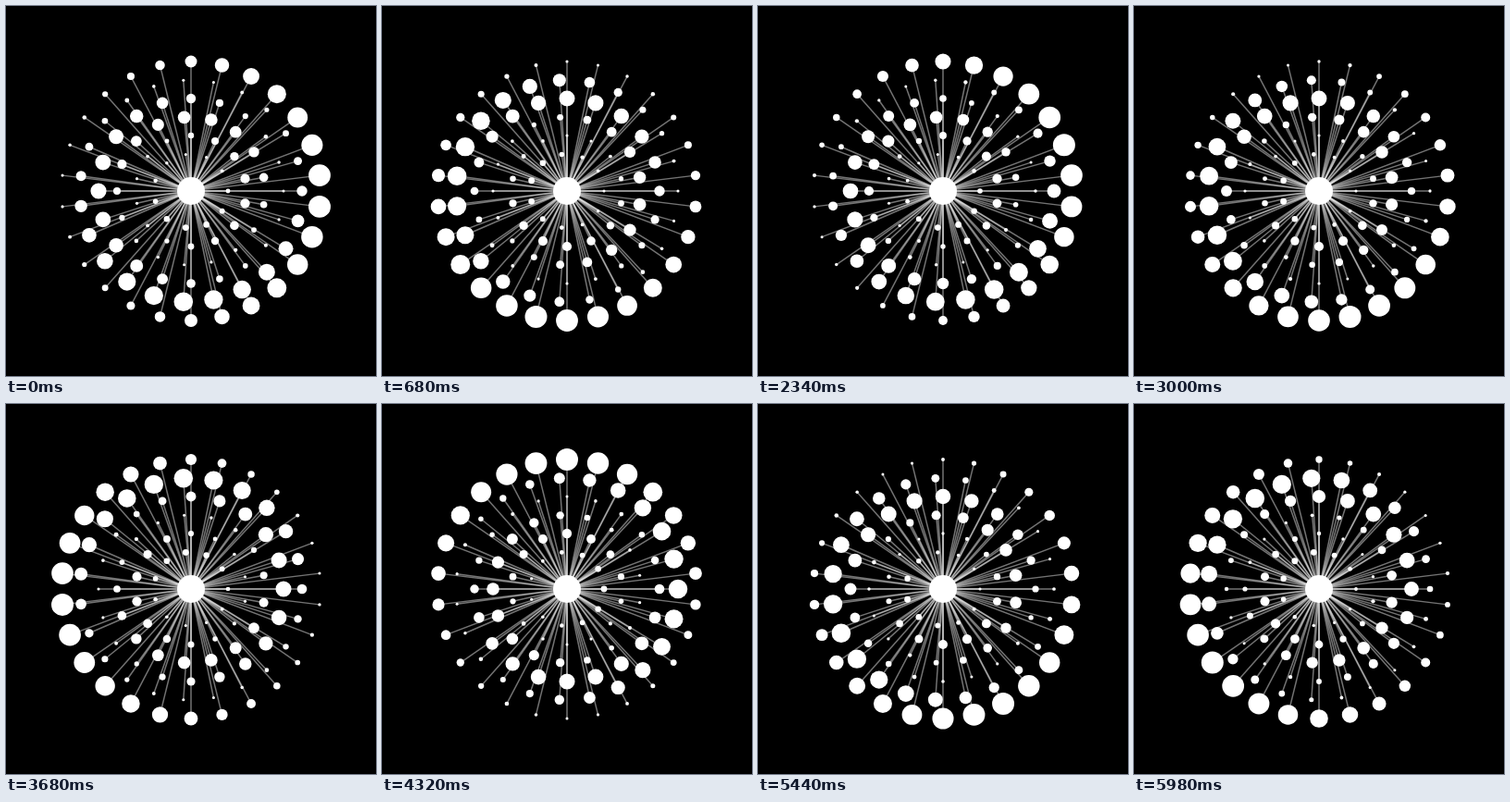
An HTML page with a canvas that plays this animation: 400 px wide and 400 px high, repeating every 6 s.

```html
<!DOCTYPE html>
<html lang="en">
<head>
<meta charset="utf-8">
<title>Pulsing rings</title>
<style>
  html, body { margin: 0; width: 100%; height: 100%; overflow: hidden; background: #000; }
  canvas { display: block; width: 400px; height: 400px; }
</style>
</head>
<body>
<canvas id="stage" width="400" height="400"></canvas>
<script>
const ctx = document.getElementById('stage').getContext('2d');
const TAU = Math.PI * 2;
const CENTER = 200;
const LOOP = 6000, PERIOD = 2500, STEP = 20;
const MIN_R = 1.5, MAX_R = 12, OUTER = 140;

// Six rings, each starting a quarter turn after the one outside it
const dots = [];
for (let ring = 0; ring < 6; ring++) {
  const count = 26 - ring * 3;
  const dist = OUTER - ring * 20;
  const start = (ring - 1) * TAU / 4;
  for (let i = 0; i < count; i++) {
    const turn = i / count;
    const angle = start + turn * TAU;
    dots.push({
      x: CENTER + Math.cos(angle) * dist,
      y: CENTER + Math.sin(angle) * dist,
      max: MAX_R * dist / OUTER,
      turn
    });
  }
}

function disc(x, y, r) {
  ctx.beginPath();
  ctx.arc(x, y, r, 0, TAU);
  ctx.fill();
}

function draw(time) {
  ctx.fillStyle = '#000';
  ctx.fillRect(0, 0, 400, 400);

  ctx.strokeStyle = 'rgba(255, 255, 255, 0.45)';
  ctx.lineWidth = 1.5;
  for (const d of dots) {
    ctx.beginPath();
    ctx.moveTo(CENTER, CENTER);
    ctx.lineTo(d.x, d.y);
    ctx.stroke();
  }

  ctx.fillStyle = '#fff';
  const phase = (time + STEP) / PERIOD;
  for (const d of dots) {
    const swell = (1 + Math.sin((d.turn - phase) * TAU)) / 2;
    disc(d.x, d.y, MIN_R + (d.max - MIN_R) * swell);
  }
  disc(CENTER, CENTER, 15);
}

let origin = null;
function frame(now) {
  if (origin === null) origin = now;
  const time = (now - origin) % LOOP;
  draw(Math.floor(time / STEP + 1e-6) * STEP);
  requestAnimationFrame(frame);
}
draw(0);
requestAnimationFrame(frame);
</script>
</body>
</html>
```
